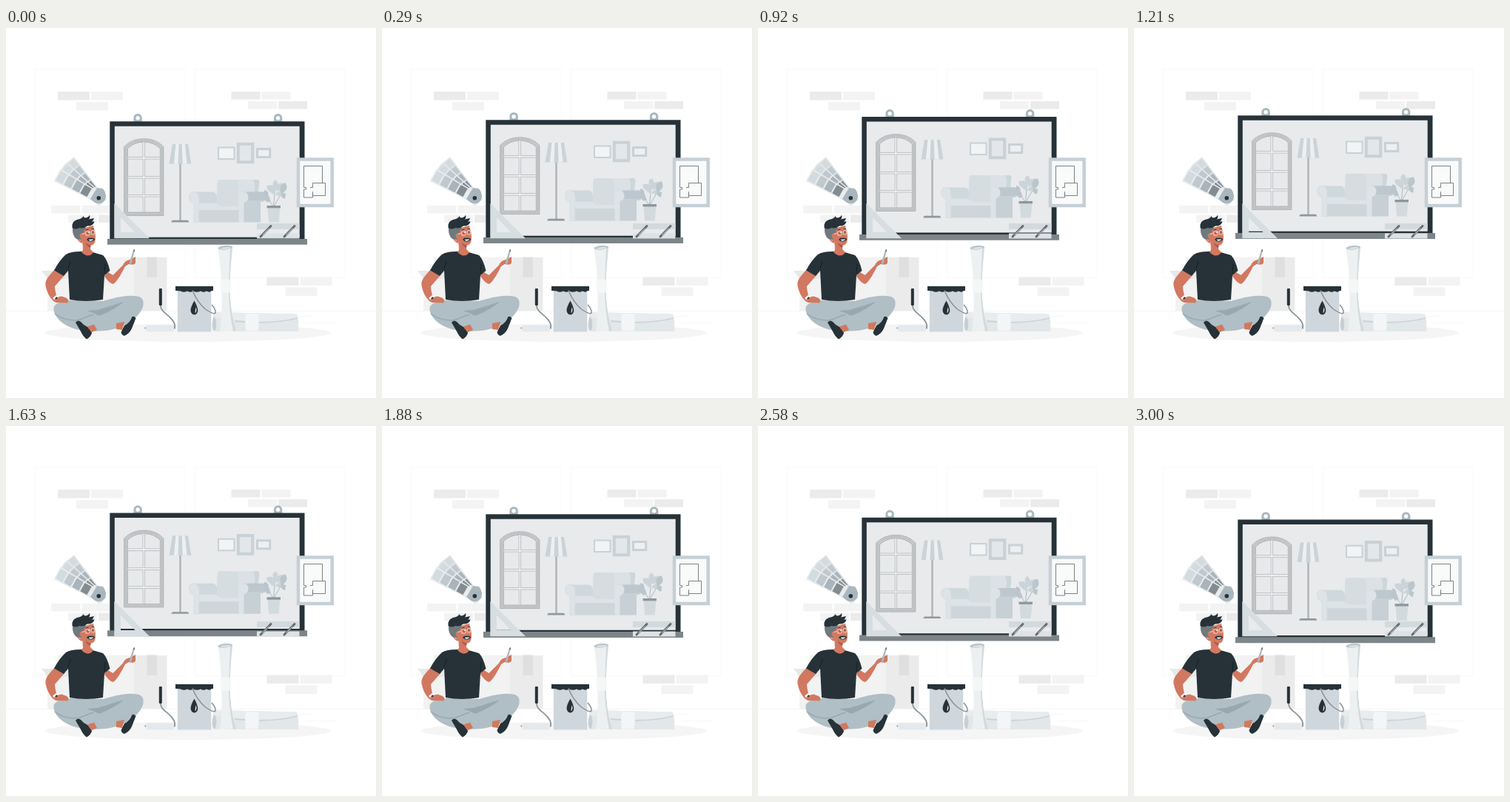
Recreate the animation shown at these times as an HTML page. Size 500x500 px, loop 3.04 s.

```html
<!DOCTYPE html>
<html lang="en">
<head>
<meta charset="utf-8">
<title>Interior designer</title>
<style>
html, body { margin: 0; width: 100%; height: 100%; overflow: hidden; background: #fff; }
svg { display: block; width: 100vw; height: 100vh; }
</style>
</head>
<body>
<svg viewBox="0 0 500 500">
  <g fill="none" stroke="#f9f9f9">
    <path d="M39.500 55.500H242.500V337.500H39.500ZM255.500 55.500H458.500V337.500H255.500Z"/>
    <path d="M0 382.500H500" stroke="#f3f3f3" stroke-width=".8"/>
    <path d="M392 389.500H416M404 398.500H447" stroke="#f7f7f7"/>
  </g>
  <g id="bricks"></g>

  <!-- cardboard box -->
  <path d="M70 310H174V382H56V339L70 328Z" fill="#f2f2f2"/>
  <path d="M173 310H217.500V382H173Z" fill="#ebebeb"/>
  <path d="M48 328H86V339H56Z" fill="#e8e8e8"/>
  <path d="M190.500 309.500H204V337H190.500Z" fill="#dfdfdf"/>
  <ellipse cx="245.500" cy="412" rx="193.500" ry="12" fill="#f5f5f5"/>

  <g id="board">
    <g fill="#a9b8c0" fill-rule="evenodd">
      <path id="hanger" d="M172.400 127V121.500a5.700 5.600 0 0 1 11.400 0V127ZM175.400 121.700a2.700 2.700 0 1 0 5.400 0a2.700 2.700 0 1 0 -5.400 0Z"/>
      <use href="#hanger" x="189.500"/>
    </g>
    <path d="M140.300 126.200H403.500V286H140.300Z" fill="#263238"/>
    <path d="M146.800 132.700H396.700V282.700H146.800Z" fill="#e8eaec"/>
    <path d="M137 285H407V292.900H137Z" fill="#7d8588"/>

    <!-- arched window -->
    <path d="M159.700 253.500V160.500Q170 149.700 186.300 149.700Q203 149.700 212.800 160.500V253.500Z" fill="#cfd1d3" stroke="#9ea2a5" stroke-width=".8"/>
    <path d="M161.800 251.500V161.500Q171.500 151.700 186.300 151.700Q201 151.700 210.800 161.500V251.500Z" fill="none" stroke="#a4a8aa" stroke-width=".7"/>
    <path d="M164 249.300V162.500Q173 153.700 186.300 153.700Q199.500 153.700 208.800 162.500V249.300Z" fill="#f2f3f4" stroke="#9ea2a5" stroke-width=".7"/>
    <g id="panes" fill="#e7e9eb" stroke="#a9adaf" stroke-width=".7">
      <path d="M164.500 174.500V162.800Q173 154.500 185 154.200V174.500Z"/>
      <path d="M187.500 174.500V154.200Q199.500 154.500 208.300 162.800V174.500Z"/>
    </g>

    <!-- floor lamp -->
    <path d="M234.200 183H236.800V260.500H234.200Z" fill="#b3b7b9"/>
    <path d="M223.500 262.500Q223.500 259.800 226 259.800H245Q247 259.800 247.200 262.500Z" fill="#90989c"/>
    <path d="M225 157H246L250.300 183.500H220.500Z" fill="#cad3d8"/>
    <path d="M229.500 157H233.500L232.500 183.500H226.800ZM237.700 157H241.800L244.500 183.500H238.700Z" fill="#edf0f1"/>

    <!-- wall pictures -->
    <g stroke="#c8d1d6">
      <path d="M287 161.500H308.500V177H287Z" fill="#f1f3f4" stroke-width="2"/>
      <path d="M313.800 156.700H333.200V181.300H313.800Z" fill="#e3e7e9" stroke-width="4"/>
      <path d="M339.500 163.500H356.700V174.500H339.500Z" fill="#edf0f1" stroke-width="3"/>
    </g>

    <!-- armchair -->
    <path d="M313 205H340Q342.500 205 342.300 209L339 241H310Z" fill="#dbe1e4"/>
    <path d="M334 205H340Q342.500 205 342.300 209L340 228H333Q339 216 334 205Z" fill="#cdd6da"/>
    <path d="M288 205H311Q314 205 314 209V246H284L285.500 209Q286 205 288 205Z" fill="#d5dde0"/>
    <path d="M254 221.500H280Q285 223 285 229V237H260Z" fill="#cfd8dc"/>
    <path d="M254 231H261.500V262.500H254Z" fill="#dde3e6"/>
    <path d="M247.500 228C247 219 262 219 261 230V262.500H254V237Q248 236 247.500 228Z" fill="#dde3e6" stroke="#ccd5d9" stroke-width=".5"/>
    <path d="M261 236.500H284Q287 241 294 241H315V248H261Z" fill="#dde3e6"/>
    <path d="M261 246H317V262.500H261Z" fill="#ced6da"/>
    <path d="M320 221.500H347Q352.500 223 352.500 229Q351 235 344 235V262.500H320Z" fill="#c6d0d5"/>
    <path d="M326 221.500H347Q352.500 223 352.500 229Q350 233 344 233H326Z" fill="#bcc8cd"/>
    <path d="M314.500 229C314 219 328 219 327.500 229Q327 235 321.500 236V262.500H314.500Z" fill="#dde3e6"/>

    <!-- potted plant -->
    <path d="M361.500 241L364 214M361 241L352 228M362 241L373 222" fill="none" stroke="#aebbc2"/>
    <g id="leaves"></g>
    <path d="M353.500 242H370.500L368.700 262.500H355Z" fill="#d3dade"/>
    <path d="M352.500 240H371V243.300H352.500Z" fill="#8d979b"/>
  </g>

  <!-- set square, then the open pen tray -->
  <path fill-rule="evenodd" d="M146.300 237L194 284.300H146.300ZM155 256V276H174.500Z" fill="#d6dee1"/>
  <path d="M339 264H396.500V272H339Z" fill="#d3dade"/>
  <path d="M339 277.500H396.500V284.500H339Z" fill="#dde2e5"/>
  <g fill="none" stroke-linecap="round">
    <path d="M344 282L358 267.500M376 282L390 267.500" stroke="#636c70" stroke-width="3"/>
    <path d="M347 279.500L355 271M379 279.500L387 271" stroke="#a3acb0" stroke-width="1.300"/>
  </g>

  <!-- floor plan -->
  <path d="M395 177.500H440.700V240H395Z" fill="#f9fafa" stroke="#c5d0d6" stroke-width="4.500"/>
  <path d="M402.500 210V186.500H427.500V209.500M402.500 210V215.500H405.500V218H402.500V229H414.500V224M411 215.500H414.500V209.500H431.500V226.500H414.500V221" fill="none" stroke="#5e6568" stroke-width=".8"/>

  <g id="fan"></g>
  <path d="M114 231L123 216L131 217Q137 225 134 232Q129 240 120 236Z" fill="#a9b6bd"/>
  <circle cx="125.300" cy="229.700" r="2.800" fill="#263238"/>

  <!-- paper rolls -->
  <path d="M281 384L393 386.500Q396 396 395 410H283Q278 397 281 384Z" fill="#e2e7e9"/>
  <path d="M282 384L393 386.500V392Q360 400 308 395L281 391Z" fill="#e8ecee"/>
  <path d="M309 396Q360 401 394 392" fill="none" stroke="#cbd4d8" stroke-width="1.800"/>
  <ellipse cx="281.500" cy="400" rx="2.800" ry="9.500" fill="#c5cfd4"/>
  <path d="M324.500 386H340.500Q343 398 340.500 409.500H324Q322 397 324.500 386Z" fill="#f3f5f6"/>
  <path d="M286.500 297L306 296Q301 345 303 366Q305 392 311 409L289 410.500Q293 379 291 350Q290 319 286.500 297Z" fill="#edf0f1"/>
  <path d="M303 298L306 296Q301 345 303 366Q305 392 311 409L307 410Q300 375 301 345Z" fill="#d2dadd"/>
  <path d="M289 341Q296 338 302.500 340V357Q296 359 290.500 357Z" fill="#f5f7f7"/>
  <ellipse cx="296.300" cy="296.800" rx="9.800" ry="2.700" transform="rotate(-5 296.300 296.800)" fill="#b8c4ca"/>
  <ellipse cx="297" cy="297.500" rx="7" ry="1.300" transform="rotate(-5 297 297.500)" fill="#dde3e5"/>

  <!-- paint bucket -->
  <path d="M231.800 353H277.300V410.500H231.800Z" fill="#cfd7dd"/>
  <path d="M229 349H280V355H278Q275 358 271 355.500Q267 358 263 355.500Q258 358 253 355.500Q249 358 245 355.500Q240 358 236 355.500L231 355H229Z" fill="#263238"/>
  <path d="M254.500 368.500Q249.500 377 249.500 381.500Q250 387 254.500 387.500Q259 387 259.300 381.500Q259 377 254.500 368.500Z" fill="#263238"/>
  <path d="M256.800 377Q258.500 383 255.500 385.500Q255.500 381 256.800 377Z" fill="#e5eaed"/>
  <path d="M252 354.500Q258 370 269 379.500Q281 388 283 385Q284 381 278 374" fill="none" stroke="#879196" stroke-width="1.500"/>

  <!-- paint roller -->
  <path d="M208.800 374C209 383 215 384 221.500 391C227 396 229 400 228 405.500H187.500" fill="none" stroke="#8b9599" stroke-width="1.800"/>
  <rect x="189" y="401.500" width="38" height="9" rx="1.500" fill="#e6e9eb"/>
  <rect x="206.800" y="352" width="4" height="23" rx="1" fill="#263238"/>

  <!-- man: legs -->
  <path d="M86 368Q70 369 65 376C62 386 72 398 86 404C98 410 125 411 141 408C157 405 178 395 185 377Q188 364 177 362.500C163 360 146 365 131 369Z" fill="#b0bec5"/>
  <path d="M109 382L124 381L159 370Q148 380 126 389L118 385Z" fill="#98a8af"/>
  <path d="M66 386Q78 396 97 395L118 387" fill="none" stroke="#98a8af" stroke-width="1.500"/>
  <path d="M109 404L119 400.500L123 408L114 412ZM149 399L160 397L157 408L149 407Z" fill="#d27860"/>
  <path d="M94 398Q97 394 101 397Q105 402 110 404L116 412Q115 417 109 420.500Q104 417 101 410Z" fill="#263238"/>
  <path d="M175.500 392Q172 388 170 391Q168 398 160 402L155.500 411Q156 415 160 416Q167 413 170 406Z" fill="#263238"/>

  <!-- man: arms and torso -->
  <path d="M67 325C60 333 52 340 53.500 348Q55 358 62 367Q66 372 72 371L83 371.500Q86 368 82 365L75 362.500L69 364Q66 355 66 349L80 333Z" fill="#d27860"/>
  <path d="M64 366L69.500 361.500" stroke="#f2f2f2" stroke-width="3"/>
  <path d="M67 366L69 364" stroke="#263238" stroke-width="2"/>
  <path d="M132 327L139.500 331L144.500 334L158 320.500Q161 314 166 313.500L175 309V317Q174 321 166 319L161 322Q151 342 145 346Q140 346 132 334Z" fill="#d27860"/>
  <path d="M168 320L166.800 317L172 300L173.700 299L173.500 302L169.500 318Z" fill="#a9b8c0"/>
  <path d="M172 301L174 298.500L173.500 303Z" fill="#59656b"/>
  <path d="M101 302Q87 302 81 306Q72 314 65 327.500L78 335L84 328L86 367Q108 371 131 367L133 334L140.500 328Q137 313 131 307L117 303Z" fill="#263238"/>
  <path d="M84 326L87 315M133 332L134 319" stroke="#121c21" stroke-width=".8"/>

  <!-- man: head -->
  <path d="M103 284L119 271Q122 281 120.500 288Q119 294 114 293.500V299L118 303Q114 309 108 307Q103 305 102 302L104 300Z" fill="#d27860"/>
  <path d="M108 290.500Q111 293.500 115 293.500L114 297Q109 295 108 290.500Z" fill="#ad594a"/>
  <path d="M91 269Q89 276 92.500 282Q95 286 101 287L104 281L101 278Q105 275 107 270L118 267L120 276L112 275L105 284L103 291Q98 289 96 285Z" fill="#d27860"/>
  <path d="M90 268Q89 281 96 285.500L102 286.500V279Q105 277 108 269Z" fill="#70797c"/>
  <path d="M89.500 270Q88 262 96 259Q103 258 104.500 254Q105 256.500 107.500 256.500Q112 255.500 113 252.500Q114 256.500 112 258.500L119 257Q118 260.500 116 261.500L119.500 261.500Q118 268 110 267.500Q105 271.500 99 270Q94 273 89.500 270Z" fill="#263238"/>
  <ellipse cx="102" cy="281" rx="2.500" ry="3.300" fill="#d27860"/>
  <path d="M109 286Q111 283 114.500 283.700Q118 283 120.300 285.500Q118.500 288.700 114 288.500Q110.500 288 109 286Z" fill="#263238"/>
  <path d="M111.500 285.800L118.500 285.600Q117 287.900 114 287.700Q112.500 287.300 111.500 285.800Z" fill="#fff"/>
  <path d="M107.500 273L111.500 272.300M116 271.500L118.500 271.500" stroke="#263238" stroke-width=".9"/>
  <circle cx="110.500" cy="277.500" r=".7" fill="#263238"/>
  <circle cx="117.500" cy="276" r=".7" fill="#263238"/>
  <g fill="none" stroke="#e4e9eb" stroke-width=".8">
    <circle cx="110.300" cy="277.500" r="3.200"/>
    <ellipse cx="117.500" cy="276.300" rx="2.500" ry="3"/>
    <path d="M107 277.500L102 278.500"/>
  </g>
</svg>
<script>
const LOOP = 3040, LIFT = 10, LEAD = 50;
const byId = id => document.getElementById(id);
const rect = (x, y, w, h, fill) =>
  `<rect x="${x}" y="${y}" width="${w}" height="${h}"${fill ? ` fill="${fill}"` : ''}/>`;

const dark = '#ebebeb', light = '#f3f3f3';
const brickRows = [
  [70, 86, 43, dark, light], [95, 100, 43, light],
  [304.5, 86, 39, dark, light], [327, 99, 39, light, dark],
  [61, 240, 39.500, light, light], [84, 252.500, 39, light, dark],
  [352.500, 336.500, 43, dark, light], [377.500, 350.500, 43, light]
];
byId('bricks').innerHTML = brickRows.map(([x, y, w, ...fills]) =>
  fills.map((fill, i) => rect(x + i * (w + 2), y, w, w > 40 ? 11.5 : 10.5, fill)).join('')).join('');

byId('panes').innerHTML += [[177, 23.5], [203, 22.5], [228, 21]].map(([y, h]) =>
  [164.500, 187.500].map(x => rect(x, y, 20.700, h)).join('')).join('');

// Each leaf: base point, angle and length.
const leaves = [
  [364, 218, 0, 13], [364, 220, 48, 15], [363, 222, -50, 14],
  [364, 225, 75, 12], [363, 226, -22, 15], [372, 224, 20, 16],
  [371, 227, 70, 8], [372, 222, 150, 10], [354, 230, -75, 8],
  [354, 229, -25, 11], [354, 226, 180, 10], [358, 234, -70, 9]
];
byId('leaves').innerHTML = leaves.map(([x, y, angle, len], i) =>
  `<path d="M0 0Q${-len * .55} ${-len * .6} 0 ${-len}Q${len * .55} ${-len * .6} 0 0Z"
    transform="translate(${x} ${y}) rotate(${angle})" fill="${i < 5 ? '#cbd5d9' : '#bac6cc'}"/>`).join('');

// Colour cards, all turning on the same rivet.
const tones = ['#838d91', '#a9b5bb', '#bfc9ce', '#d4dbdf'];
const card = (angle, edge) => `<g transform="translate(125.300 229.700) rotate(${angle})">
  <path d="M-7 8L-9.500 -64H9.500L7 8Z" fill="${edge}"/>
  ${tones.map((tone, i) => rect(-6.500 - i * .3, -25 - i * 12.500, 13 + i * .6, 10.500, tone)).join('')}</g>`;
byId('fan').innerHTML = card(-39.5, '#dfe4e6') + card(-50, '#e4e8ea') + card(-61, '#e9eced');

const board = byId('board');
function draw(now) {
  const phase = ((now + LEAD) % LOOP) / LOOP;
  const rise = LIFT * (1 - Math.abs(1 - 2 * phase));
  board.setAttribute('transform', `translate(0 ${(.3 - rise).toFixed(3)})`);
}

let start;
function tick(now) {
  start ??= now;
  draw(now - start);
  requestAnimationFrame(tick);
}
draw(0);
requestAnimationFrame(tick);
</script>
</body>
</html>
```
